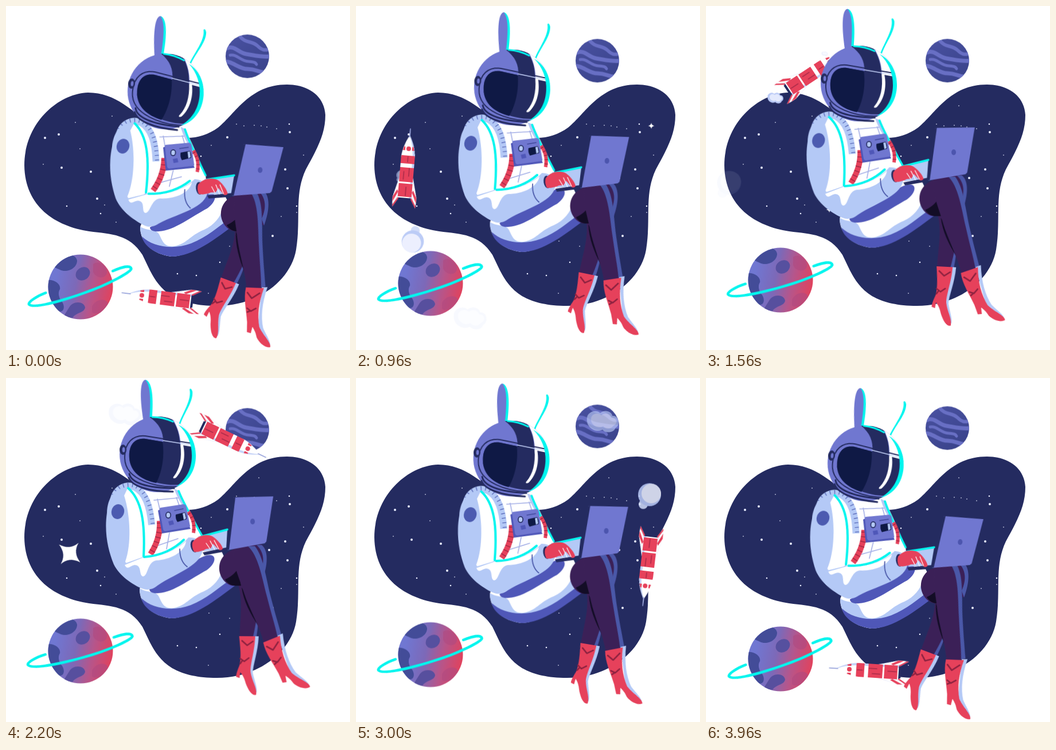
An HTML page without scripts for the animation above (4 s loop, 600 px wide and 600 px high).

```html
<!DOCTYPE html>
<html lang="en">
<head>
<meta charset="utf-8">
<title>Astronaut with laptop</title>
<style>
html, body { margin: 0; width: 100%; height: 100%; overflow: hidden; background: #fff; }
svg { display: block; width: 100vw; height: 100vh; }

.navy { fill: #242b60; } .ink { fill: #0f1945; } .lav { fill: #7077d0; } .white { fill: #fff; }
.pale { fill: #b4c9f6; } .shade { fill: #4f57b8; } .red { fill: #e6415b; } .plum { fill: #3b2057; }
.edge { fill: #4a58a8; } .cyan { fill: #00f5ee; } .black { fill: #130d26; }
.line { fill: none; stroke-linecap: round; stroke-linejoin: round; }
.flat { stroke-linecap: butt; }
.c { stroke: #00f5ee; stroke-width: 4; } .n { stroke: #242b60; stroke-width: 2; }
.l { stroke: #a3aee6; stroke-width: 1.6; } .d { stroke: #8e2240; stroke-width: 2.6; }

/* each part swings from its low pose up to where it is drawn, and back */
.sway {
  --x: 0px; --y: 0px; --r: 0deg; --o: 0 0;
  animation: sway 4s infinite cubic-bezier(.37,0,.63,1); transform-origin: var(--o);
}
@keyframes sway {
  0%, 100% { transform: translate(var(--x), var(--y)) rotate(var(--r)); }
  52% { transform: translate(0px, 0px) rotate(0deg); }
}
.bob { animation: bob 2s -.75s infinite alternate cubic-bezier(.37,0,.63,1); }
@keyframes bob { from { transform: translateY(-6px); } to { transform: translateY(6px); } }

.puff { opacity: 0; animation: puff 4s calc(var(--t) - 4s) infinite linear; }
@keyframes puff {
  0% { transform: translate(0px, 0px) scale(.15); opacity: 1; }
  8% { transform: translate(calc(var(--x) * .5), calc(var(--y) * .5)) scale(.95); opacity: 1; }
  14% { opacity: .85; }
  19% { transform: translate(var(--x), var(--y)) scale(1.05); opacity: 0; }
  100% { transform: translate(var(--x), var(--y)) scale(1.05); opacity: 0; }
}
.twinkle { transform: scale(0); animation: twinkle 4s calc(var(--t) - 4s) infinite ease-in-out; }
@keyframes twinkle { 0%, 10%, 100% { transform: scale(0); } 5% { transform: scale(1); } }
</style>
</head>
<body>
<svg viewBox="0 0 600 600">
<defs>
  <linearGradient id="dusk" x1="0" y1=".4" x2="1" y2=".6">
    <stop offset=".1" stop-color="#7077d2"/><stop offset=".42" stop-color="#7d69b8"/>
    <stop offset=".68" stop-color="#b5568c"/><stop offset="1" stop-color="#e2425c"/>
  </linearGradient>
  <linearGradient id="haze" x2=".6" y2="1"><stop offset="0" stop-color="#4a52a2"/><stop offset="1" stop-color="#3b448c"/></linearGradient>
  <clipPath id="bigDisc"><circle r="56.5"/></clipPath>
  <clipPath id="smallDisc"><circle r="38"/></clipPath>
  <clipPath id="dome"><ellipse cx="264" cy="133" rx="66" ry="66"/></clipPath>
  <path id="spark" fill="#fff" d="M0-22Q3-4 22 0Q3 4 0 22Q-3 4-22 0Q-3-4 0-22Z"/>
  <g id="ball">
    <circle cx="-11" cy="17" r="8" fill="#cfdaf9"/>
    <circle r="20" fill="#b9c9f6"/><circle cx="3" cy="-2" r="17" fill="#ebeffe"/>
  </g>
  <g id="cloud">
    <path fill="#b9c9f6" d="M-27-4C-28-18-10-22-4-15C4-22 16-18 17-10C28-12 32 6 22 11C20 20 4 20 0 14C-12 20-28 10-27-4Z"/>
    <path fill="#e3e9fd" d="M-20-4C-20-14-8-17-2-11C5-17 14-13 15-7C25-7 27 4 19 7C14 14 5 13 1 8C-8 13-20 6-20-4Z"/>
  </g>
  <g id="fin">
    <path fill="#dfe7fc" d="M-12-11L-52-21L-69-20L-52-10Z"/>
    <path class="white" d="M-16-11L-52-21L-66-20L-50-13Z"/>
    <path class="red" d="M-60-20.5L-51-20.8L-38-14L-42-12ZM-69-20L-65-20.3L-50-11L-53-10Z"/>
  </g>
</defs>

<path class="navy" d="M143 151C90 153 32 205 32 278C33 350 86 384 145 393C185 398 215 398 238 434C258 474 270 523 368 523C440 523 497 478 506 425C515 370 502 330 523 285C545 245 557 222 557 190C555 155 525 137 490 137C425 137 400 188 370 212C345 230 315 235 285 225C235 205 205 151 143 151Z"/>

<!-- stars: zero-length dashes with round caps -->
<g class="line" stroke="#e9edff">
  <path stroke-width="4" d="M92 224h0M68 230h0M97 282h0M148 289h0M159 336h0M465 401h0M495 220h0M487 285h0M491 318h0M386 229h0M459 300h0"/>
  <path stroke-width="2.6" d="M106 349h0M165 362h0M299 467h0M373 447h0M340 262h0M494 206h0M332 470h0M507 349h0"/>
  <path stroke-width="1.7" d="M121 203h0M129 249h0M65 276h0M172 347h0M192 377h0M185 192h0M390 419h0M354 410h0M353 501h0M519 260h0M441 174h0M433 208h0M445 209h0M455 211h0M472 214h0M415 209h0M402 206h0M358 243h0M480 367h0M507 360h0"/>
</g>
<g transform="translate(515 209) scale(.24)"><use href="#spark" class="twinkle" style="--t:.76s"/></g>
<g transform="translate(215 355) scale(.24)"><use href="#spark" class="twinkle" style="--t:1.36s"/></g>
<g transform="translate(111 306) rotate(40) scale(1.1)"><use href="#spark" class="twinkle" style="--t:2s"/></g>

<!-- small planet -->
<g transform="translate(421 90)"><g class="bob">
  <circle r="38" fill="url(#haze)"/>
  <g class="line" clip-path="url(#smallDisc)" stroke="#686fc4" stroke-width="6">
    <path d="M-14-36C-4-22 8-28 18-18S32-12 42-12"/>
    <path stroke-width="7" d="M-36-14C-22-20-16-6-2-4S24 2 42 0"/>
    <path stroke-width="5" d="M-30-2C-18-4-12 8 2 9S14 12 16 14"/>
    <path stroke-width="7" d="M-42 10C-28 6-16 22 0 22S18 28 30 28"/>
  </g>
</g></g>

<!-- exhaust -->
<g transform="translate(214 522)" opacity=".7"><use href="#cloud" class="puff" style="--t:.24s;--x:-16px;--y:24px"/></g>
<g transform="translate(97 400) rotate(160)"><use href="#ball" class="puff" style="--t:.56s;--x:3px;--y:-18px"/></g>
<g transform="translate(89 292)" opacity=".6"><use href="#ball" class="puff" style="--t:.84s;--x:-51px;--y:17px"/></g>
<g transform="translate(124 162)"><use href="#cloud" class="puff" style="--t:1.42s;--x:-14px;--y:-6px"/></g>
<g transform="translate(207 84)" opacity=".3"><use href="#cloud" class="puff" style="--t:1.54s;--x:0px;--y:-23px"/></g>
<g transform="translate(430 108)" opacity=".85"><use href="#cloud" class="puff" style="--t:2.42s;--x:0px;--y:-40px"/></g>
<g transform="translate(509 214)"><use href="#ball" class="puff" style="--t:2.46s;--x:4px;--y:-14px"/></g>
<g transform="translate(536 243) rotate(110)"><use href="#ball" class="puff" style="--t:3.02s;--x:-16px;--y:-32px"/></g>

<!-- rocket, nose along +x -->
<g>
  <use href="#fin"/><use href="#fin" transform="scale(1 -1)"/>
  <path class="navy" d="M-56-10L-48-12V12L-56 10Z"/>
  <path class="white" d="M-52-12H18C36-11 48-5 56-1L70 0L56 1C48 5 36 11 18 12H-52Z"/>
  <path fill="#c3d1f7" d="M-52 8H18C34 8 46 4 56 0L70 0L56 1C48 5 36 11 18 12H-52Z"/>
  <path class="red" d="M-50-12H-27V12H-50ZM-24-12H1V12H-24ZM8-12H18L22-11.5V11.5L18 12H8Z"/>
  <path class="line" stroke="#a52a48" stroke-width="1.3" d="M-48 1H-33M-20-5H-6M-14 4H0M11 0H20"/>
  <circle class="red" cx="34" cy="0" r="4"/><path class="red" d="M31-10L38-8L37-6H31ZM31 10L38 8L37 6H31Z"/>
  <path class="line" stroke="#8f9bd6" stroke-width="1.4" d="M54 0H69"/>
  <animateMotion dur="4s" repeatCount="indefinite" rotate="auto" calcMode="paced"
    path="M271 509C176 497 79 413 89 283C95 213 131 153 190 115C253 74 324 76 392 109C478 151 520 237 508 331C503 366 490 401 470 430C427 492 341 518 271 509"/>
</g>

<!-- ringed planet -->
<g transform="translate(130 476)"><g class="sway" style="--y:14px">
  <circle r="56.5" fill="url(#dusk)"/>
  <g clip-path="url(#bigDisc)">
    <path fill="#434c98" d="M-50-45C-30-62-8-58-6-46C-6-32-24-24-36-30C-44-34-52-36-50-45ZM-60-12C-44-14-34-4-36 4C-40 10-38 20-32 26C-26 36-30 46-40 42L-62 20Z"/>
    <ellipse cx="4" cy="-23" rx="13" ry="11" fill="#56509f" transform="rotate(-35 4 -23)"/>
    <path fill="#574f9e" d="M-20 36C-14 24 6 24 8 36C6 46-8 44-14 54L-30 52Z"/>
    <path fill="#b04a80" opacity=".6" d="M22-40C32-48 48-36 46-24C42-12 26-16 22-26ZM20 34C28 18 48 20 48 30C44 44 26 50 20 44Z"/>
  </g>
  <g transform="rotate(-14)"><path class="line c sway" style="--r:-4deg;stroke-width:4.6" d="M-61-9C-80-8-95-3-95 1C-91 11-40 13 0 12C50 11 94 2 94-3C94-10 80-11 62-9"/></g>
</g></g>

<!-- hips -->
<g class="sway" style="--x:1px;--y:18px">
  <path class="white" d="M233 368C240 340 300 300 374 298L396 345C360 385 320 419 288 419C255 415 233 395 233 368Z"/>
  <path class="pale" d="M233 367C248 375 261 371 266 380C272 392 275 403 292 401C315 397 318 383 345 372C362 364 374 350 378 332L398 350C360 385 320 419 288 419C255 415 233 395 233 367Z"/>
  <path class="shade" d="M236 384C255 402 290 408 322 396C350 385 370 366 385 356L402 360C365 388 325 419 288 419C262 416 240 402 236 384Z"/>
  <path class="shade" d="M250 368C285 350 315 322 350 309C368 305 368 322 350 335C325 348 292 374 266 375C258 376 250 374 250 368Z"/>
</g>

<!-- legs -->
<g class="sway" style="--x:3px;--y:31px">
  <path class="plum" d="M420 292L446 290C458 300 457 326 447 352L430 345Z"/>
  <path class="edge" d="M437 291H446C458 300 457 326 447 352L443 340C452 320 450 303 437 291Z"/>

  <g class="sway" style="--x:-4px;--y:-1px;--r:17.6deg;--o:410px 345px">
    <path class="plum" d="M404 325L442 330C446 370 443 420 437 452H408C408 420 414 390 405 360Z"/>
    <path class="edge" d="M440 400C441 425 439 440 437 452H431C435 435 437 420 440 400Z"/>
    <g class="sway" style="--r:3deg;--o:423px 450px">
      <path class="pale" d="M430 450H441C440 478 431 500 431 514C434 528 439 538 438 549L425 520Z"/>
      <path class="red" d="M407 450H435C434 478 427 495 427 512C430 530 439 540 437 552C431 555 424 546 419 533C416 522 413 517 409 513L408 523L402 521C402 515 405 508 408 500C411 485 409 470 407 450Z"/>
      <path class="line d" d="M412 458L421 466L431 459M409 489L416 494L424 488M409 498L413 492"/>
    </g>
  </g>

  <path class="plum" d="M412 294C384 299 370 315 372 335C374 350 385 361 396 362L430 340Z"/>
  <path class="black" d="M382 351C390 348 399 341 405 332L410 362H398C391 361 385 357 382 351Z"/>

  <g class="sway" style="--r:11.7deg;--o:420px 300px">
    <path class="black" d="M411 365C415 390 426 410 440 432L424 385Z"/>
    <path class="plum" d="M396 303C406 293 424 291 432 296C444 315 450 345 458 380C466 410 474 430 480 450L450 462C443 433 424 402 415 374C409 352 398 335 396 303Z"/>
    <path class="edge" d="M422 293C440 310 446 345 455 380C464 415 470 432 474 452L481 449C474 425 468 405 461 378C452 340 448 310 434 293Z"/>
    <g class="sway" style="--r:13deg;--o:464px 455px">
      <path class="pale" d="M474 449L483 445C486 475 494 497 506 513C516 522 529 529 530 537L500 525Z"/>
      <path class="red" d="M449 461L478 449C480 475 487 497 499 514C510 524 530 530 531 538C525 543 511 540 502 532C497 525 492 521 488 519L490 530L483 531L476 515C465 495 453 480 449 461Z"/>
      <path class="line d" d="M455 468L466 474L475 460M466 493L474 495L480 487M469 499L473 495"/>
    </g>
  </g>
</g>

<!-- chest and upper arm -->
<g class="sway" style="--y:14px;--r:3.5deg;--o:240px 380px">
  <path class="white" d="M212 186C245 176 285 178 300 194C316 222 330 250 342 274L345 300L240 335Z"/>
  <path class="pale" d="M293 193L303 197C306 207 312 217 318 228L309 223C302 215 298 205 293 193Z"/>
  <path class="line c" style="stroke-width:3.5" d="M301 197C311 222 328 250 342 275"/>
  <path class="line l" d="M258 213L300 209M264 211L269 232M297 208L302 222M285 270L280 298M262 293L300 280"/>
  <path class="line flat" stroke="#b4c9f6" stroke-width="12" d="M187 214C191 191 210 185 224 190C243 200 251 222 254 256"/>
  <path class="line flat" stroke="#5f70bd" stroke-width="7" stroke-dasharray="1.5 6.5" d="M185 212C189 189 210 183 225 188C245 198 253 222 256 256"/>

  <path class="line flat" stroke="#e6415b" stroke-width="10" d="M268 249C269 270 263 290 252 307"/>
  <path class="line flat" stroke="#9f2743" stroke-width="10" stroke-dasharray="1.5 7" d="M268 252C269 270 263 290 253 305"/>
  <path class="line flat" stroke="#e6415b" stroke-width="6" d="M318 233C327 246 329 256 327 270"/>
  <path class="line flat" stroke="#9f2743" stroke-width="6" stroke-dasharray="1.5 6" d="M319 236C327 246 329 256 327 270"/>
  <path class="shade" d="M265 231L272 271L322 263L319 257L276 264L269 229Z"/>
  <path class="lav" d="M268 229Q267 227 270 226L309 220Q313 220 314 223L321 258Q321 260 318 260L278 267Q275 267 274 264Z"/>
  <ellipse class="navy" cx="283" cy="239" rx="5" ry="6"/><ellipse class="pale" cx="283" cy="239" rx="3.3" ry="4.3"/>
  <path class="ink" d="M296 238L312 234Q315 239 315 246L299 251Q295 245 296 238Z"/>
  <path class="pale" d="M308 236L312 235L314 245L310 247Z"/>
  <path class="shade" d="M283 250L291 248L293 255L285 257Z"/>
  <path class="line" stroke="#3f4899" stroke-width="1.5" d="M294 231L309 228"/>

  <path class="pale" d="M214 191C190 190 177 208 176 235C171 270 178 300 188 325C198 345 220 360 238 367L264 345L240 312C243 270 240 215 214 191Z"/>
  <path class="white" d="M212 192C234 208 241 250 239 312L226 327C218 318 214 332 208 320C219 290 217 240 206 205Z"/>
  <path class="line c" d="M213 192C236 212 243 250 240 311"/>
  <ellipse cx="195" cy="233" rx="11" ry="13" fill="#4c5bb0" transform="rotate(15 195 233)"/>
</g>

<!-- forearms and laptop -->
<g class="sway" style="--x:2px;--y:15px;--r:6.2deg;--o:240px 365px">
  <path class="pale" d="M335 276L386 264L384 297L345 302Z"/>
  <path class="line c" style="stroke-width:3.4" d="M341 276L386 264"/>
  <path class="pale" d="M239 312C270 312 300 300 318 278C330 277 340 283 343 292C345 305 337 318 322 328C304 341 280 350 264 362C258 367 252 369 245 369C230 367 203 350 200 326Z"/>
  <path class="white" d="M239 313C270 312 298 300 314 284C312 304 285 317 262 318C246 321 248 345 239 346C231 344 238 326 224 326C217 327 212 336 207 326Z"/>
  <path class="line c" d="M241 312C270 310 294 298 310 282"/>
  <path class="line" stroke="#4553a5" stroke-width="1.7" d="M303 298C303 313 308 323 316 329"/>
  <ellipse class="navy" cx="328" cy="293" rx="6" ry="11" transform="rotate(-12 328 293)"/>
  <path class="navy" d="M343 304L386 295L389 301L346 309Z"/>
  <path class="red" d="M325 287C333 274 350 271 360 276C369 282 376 290 378 297C377 300 373 301 371 299L361 289L357 297L349 298C342 302 333 304 328 303C325 298 324 292 325 287Z"/>
  <path class="line" stroke="#fff" stroke-width="1.3" d="M356 284L364 299M363 283L371 298M349 288L356 298"/>
  <path class="lav" d="M397 208L466 206L454 285L451 288L386 300Z"/>
  <path class="navy" d="M396 209L400 207L389 299L385 300Z"/>
  <ellipse cx="430" cy="250" rx="4" ry="5" fill="#4c55ae"/>
</g>

<!-- helmet -->
<g class="sway" style="--x:11px;--y:11px;--r:5.5deg;--o:213px 167px">
  <path class="white" d="M213 160C210 185 235 199 292 199L296 180Z"/>
  <path class="lav" d="M240 78C236 55 230 8 242 3C255 3 254 45 253 78Z"/>
  <path class="cyan" d="M243 3C257 6 257 45 254 76L250 76C252 45 253 14 243 3Z"/>
  <path class="cyan" d="M301 81C308 60 324 38 320 20C321 17 324 19 325 24C326 42 312 58 304 80Z"/>
  <ellipse class="lav" cx="264" cy="133" rx="66" ry="66"/>
  <g clip-path="url(#dome)">
    <path class="white" d="M285 62C300 85 305 100 305 128L335 135V60Z"/>
    <path class="navy" d="M250 64H283C299 82 303 98 304 122L274 114C275 95 268 80 250 68Z"/>
    <path class="navy" d="M215 140C213 115 226 104 243 106L332 121V160L302 186C265 189 217 172 215 140Z"/>
    <path class="ink" d="M215 140C213 115 226 104 243 106L273 111C277 140 271 165 262 183C237 178 217 165 215 140Z"/>
    <path class="line n" d="M303 189C262 192 208 178 207 140C206 112 222 99 243 101L332 115"/>
    <path class="line" stroke="#c6d3fa" stroke-width="1.6" d="M274 109L332 118"/>
    <path class="white" d="M304 116L309 117C314 140 308 162 296 174C292 176 290 174 293 171C303 158 307 140 304 116Z"/>
  </g>
  <path class="cyan" d="M300 81C322 92 331 115 331 135C331 161 318 182 296 190C315 176 324 158 324 135C324 115 316 95 300 81Z"/>
  <path class="line c" style="stroke-width:3" d="M255 68C268 68 280 71 291 76"/>
  <ellipse class="navy" cx="204" cy="125" rx="6" ry="9"/><ellipse class="lav" cx="205" cy="125" rx="2.4" ry="4.5"/>
  <path class="line" stroke="#242b60" stroke-width="3" d="M215 167C218 182 244 192 293 192M214 174C220 188 246 198 291 198"/>
</g>
</svg>
</body>
</html>
```
